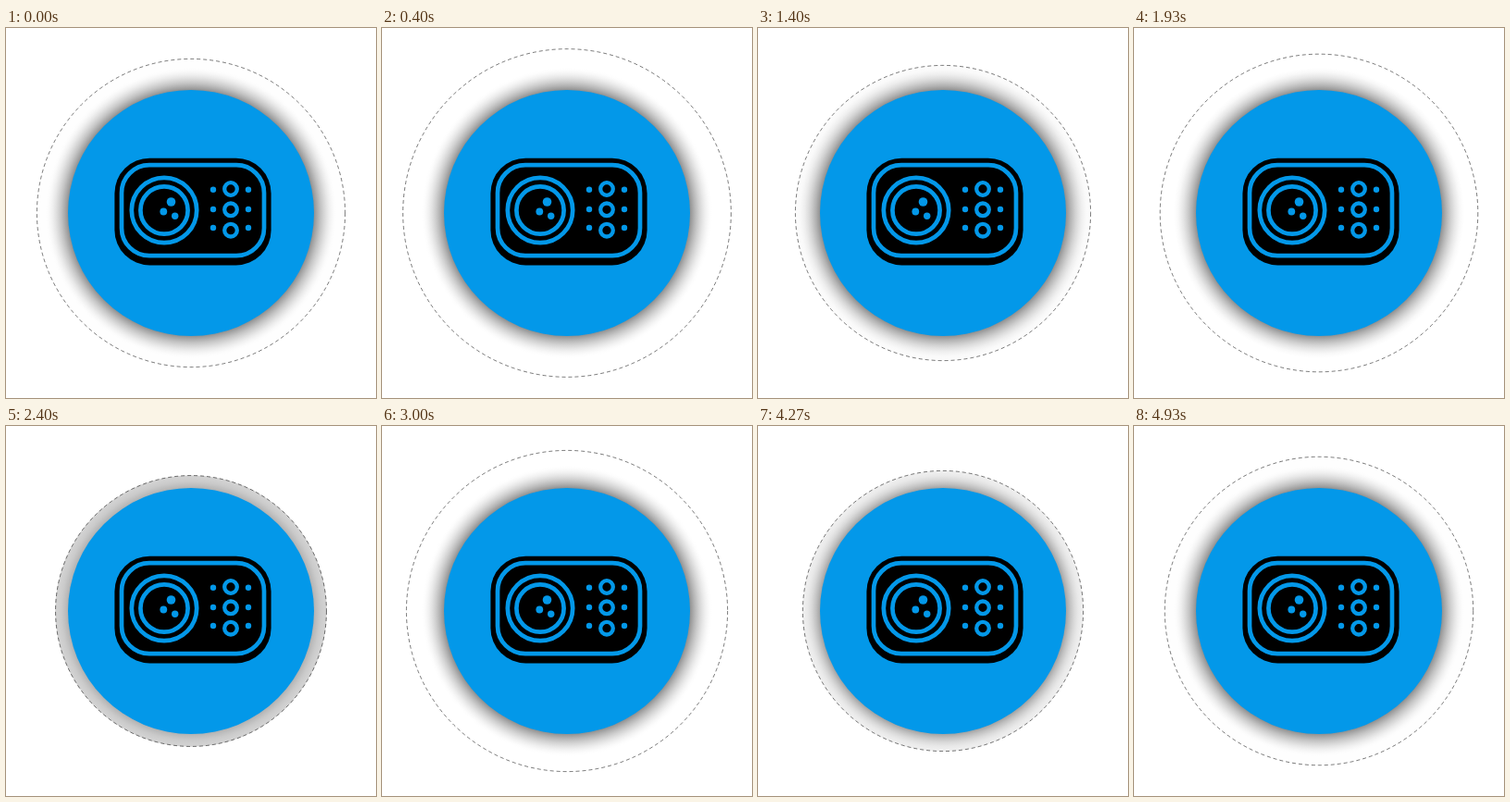
Write an HTML page with a canvas that moves like this. It is 400 px wide and 400 px high and loops after 4990 ms.

```html
<!DOCTYPE html>
<html lang="en">
<head>
<meta charset="utf-8">
<title>Pulsing lens button</title>
<style>
  html, body { margin: 0; width: 100%; height: 100%; overflow: hidden; background: #fff; }
  #stage { position: relative; width: 400px; height: 400px; overflow: hidden; }
  #stage > * { position: absolute; left: 0; top: 0; display: block; }
</style>
</head>
<body>
<div id="stage">
  <canvas id="glow" width="400" height="400"></canvas>
  <svg width="400" height="400" viewBox="0 0 400 400">
    <circle cx="200" cy="200" r="133" fill="#0398e9"/>
    <rect x="117.4" y="140.7" width="169.2" height="115.8" rx="38"/>
    <g fill="none" stroke="#0398e9" stroke-width="4.7">
      <rect x="125" y="148.2" width="154" height="98" rx="30"/>
      <circle cx="171" cy="197" r="35.2"/>
      <circle cx="171" cy="197" r="25.6"/>
      <g stroke-width="4.3">
        <circle cx="243" cy="174" r="6.8"/>
        <circle cx="243" cy="196.3" r="6.8"/>
        <circle cx="243" cy="218.7" r="6.8"/>
      </g>
    </g>
    <g fill="#0398e9">
      <circle cx="178.5" cy="188" r="4.8"/>
      <circle cx="170.3" cy="198.5" r="3.9"/>
      <circle cx="182.7" cy="203.3" r="3.7"/>
      <circle cx="224" cy="174.7" r="3.2"/>
      <circle cx="224" cy="196" r="3.2"/>
      <circle cx="224" cy="216" r="3.2"/>
      <circle cx="262" cy="174.7" r="3.2"/>
      <circle cx="262" cy="196" r="3.2"/>
      <circle cx="262" cy="216" r="3.2"/>
    </g>
  </svg>
</div>
<script>
  const LOOP = 4990, BEAT = 22, PEAK = 4, FALL = 14;
  const CORE = 133, REST = 143, REACH = 47.3, SHADE = 24;
  const RISE = [143, 146, 152, 160, 167, 174, 180, 186];
  const ctx = document.getElementById('glow').getContext('2d');

  // Fast swell, then a decelerating fall.
  function radiusAt(step) {
    const since = (step - PEAK + BEAT) % BEAT;
    if (since >= FALL) return RISE[since - FALL];
    return REST + REACH * (1 - since / FALL) ** 2;
  }

  function disc(r) {
    ctx.beginPath();
    ctx.arc(200, 200, r, 0, Math.PI * 2);
  }

  // The shade deepens as the rim opens, then keeps its depth and width.
  function draw(r) {
    const open = Math.max(0, r - REST);
    const inner = 190 - 3 * Math.min(15, open);
    const outer = 255 - 95 * Math.exp(-0.19 * open);
    const width = Math.min(SHADE, (r - CORE) * 0.9);
    const fade = ctx.createRadialGradient(200, 200, CORE, 200, 200, CORE + width);
    for (let i = 0; i <= 10; i++) {
      const x = i / 10;
      const v = Math.round(outer - (outer - inner) * (1 - x) ** 1.7);
      fade.addColorStop(x, `rgb(${v},${v},${v})`);
    }
    ctx.clearRect(0, 0, 400, 400);
    disc(r);
    ctx.fillStyle = fade;
    ctx.fill();
    disc(r - 0.4);
    ctx.lineWidth = 0.8;
    ctx.setLineDash([4, 3]);
    ctx.strokeStyle = 'rgba(0,0,0,0.65)';
    ctx.stroke();
  }

  const start = performance.now();
  let shown = -1;
  function tick() {
    const t = (performance.now() - start) % LOOP;
    // Fifteen steps a second, aligned to hundredths.
    const step = Math.floor((Math.floor(t / 10) + 0.5) * 0.15);
    if (step !== shown) draw(radiusAt(shown = step));
    requestAnimationFrame(tick);
  }
  tick();
</script>
</body>
</html>
```
